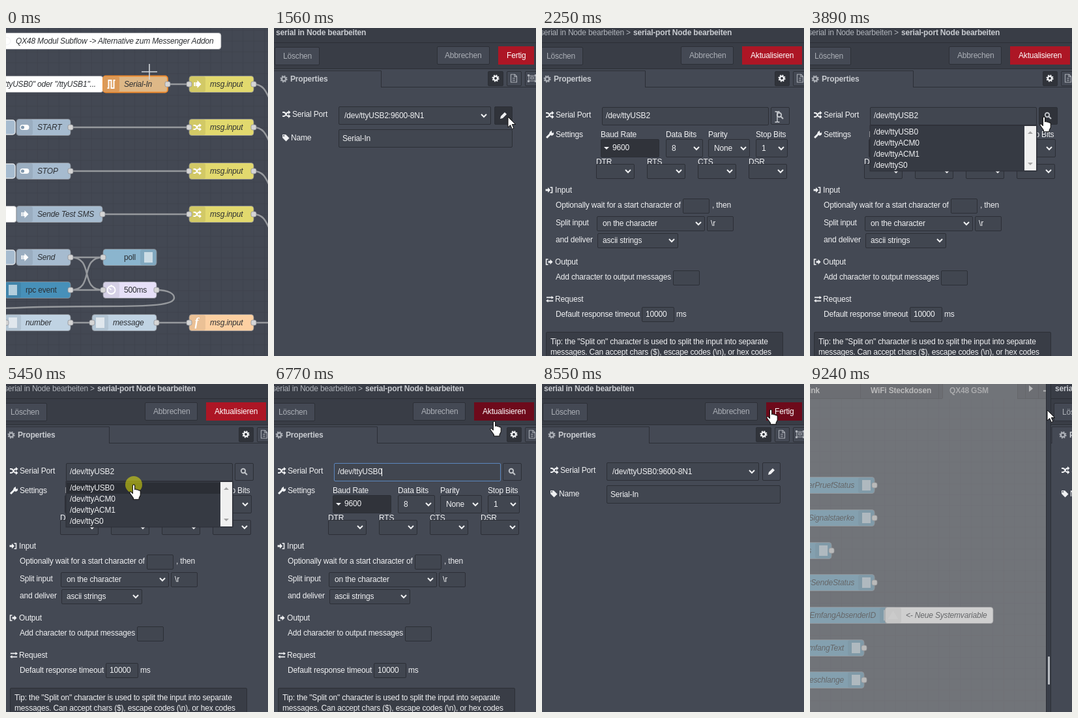
Animation, 402 px wide and 502 px high, one loop 9.31 s. Source, as an HTML page:

```html
<!DOCTYPE html>
<html lang="de">
<head>
<meta charset="utf-8">
<title>Serial port setup</title>
<style>
html, body { margin: 0; width: 100%; height: 100%; overflow: hidden; background: #434853; }
svg { display: block; width: 402px; height: 502px; font: 12px "Liberation Sans", Arial, sans-serif; letter-spacing: -.18px; }
text { white-space: pre; }
.line { fill: none; stroke: currentColor; }
</style>
</head>
<body>
<svg id="stage" viewBox="0 0 402 502"></svg>
<script>
const LOOP = 9310, BODY = '#444954', BAR = '#393d46', EDGE = '#2c2f36', LIGHT = '#f0f1f3', MUTED = '#abafb6';
const RED = '#ad1625', DARK_RED = '#6e0a1b', DARK = '#30333a';

// y is the middle of the text line
const text = (x, y, s, fill = LIGHT, extra = '') => `<text x="${x}" y="${y + 4}" fill="${fill}" ${extra}>${s}</text>`;
const bold = (x, y, s, fill = '#c9ccd1') => text(x, y, s, fill, 'font-weight="bold"');
const rect = (x, y, w, h, fill, extra = '') => `<rect x="${x}" y="${y}" width="${w}" height="${h}" fill="${fill}" ${extra}/>`;
const path = (d, extra = '') => `<path d="${d}" ${extra}/>`;
const stroke = (d, w = 2) => path(d, `class="line" stroke-width="${w}"`);
const group = (id, body, extra = '') => `<g id="${id}" ${extra}>${body}</g>`;

const icons = {
  cog: '<circle r="3.1" class="line" stroke-width="2.4"/><circle r="4.7" class="line" stroke-width="1.8" stroke-dasharray="1.9 1.79"/>',
  shuffle: stroke('M-6-3h2c4 0 3 6 7 6h1M-6 3h2c4 0 3-6 7-6h1', 1.8) + path('M3-6l3.5 3-3.5 3zM3 0l3.5 3-3.5 3z'),
  inject: path('M-5-3h2v6h-2zM-2-3h2v-3l6 6-6 6v-3h-2z'),
  toggle: '<rect x="-7" y="-4" width="14" height="8" rx="4"/><circle cx="-3" r="2.6" fill="#8199af"/>',
  wave: stroke('M-6 6h2v-12h4v12h4v-12h2', 2),
  timer: '<circle r="6" class="line" stroke-width="1.8"/>' + stroke('M0 0l-3-3M0-8v3', 1.6),
  func: '<text x="-4" y="5" font-family="Liberation Serif, serif" font-style="italic" font-weight="bold" font-size="18">f</text>',
  square: '<rect x="-6.5" y="-8" width="13" height="16" opacity=".6"/>',
  bubble: '<ellipse rx="7" ry="6" class="line" stroke="#ddd"/>',
  warn: path('M0-7l8 13h-16z', 'fill="#fff" opacity=".6"'),
  pencil: path('M-5 5l1-4 6-6 3 3-6 6z'),
  search: '<circle cx="-1" cy="-1" r="3.2" class="line" stroke-width="1.9"/>' + stroke('M1.5 1.5l3.5 3.5', 2.2),
  tag: path('M-5-5h5l5.5 5.5-5 5-5.5-5.5z') + '<circle cx="-3" cy="-3" r="1.1" fill="#444954"/>',
  wrench: stroke('M-5 5l6-6', 3) + path('M0-4l3-2v3l2 1 1-2 0 4-3 2-4-3z'),
  file: stroke('M-4.5-6h6l3 3v9h-9zM1-6v3.5h3.5M-2 0h4M-2 3h4', 1.1),
  frame: stroke('M-5-4h10v8h-10zM-2-2h4v3h-4z', 1.2) + path('M-7-6h3v3h-3zM4-6h3v3h-3zM-7 3h3v3h-3zM4 3h3v3h-3z'),
  enter: path('M-5.5-1.5h3.5v-2.5l4 4-4 4v-2.500h-3.500z') + stroke('M1.500-4h3v8h-3', 1.5),
  leave: path('M-1.500-1.500h3v-2.500l4 4-4 4v-2.500h-3z') + stroke('M-1.500-4h-3v8h3', 1.5),
  swap: path('M-6-4h9v-2l4 3-4 3v-2h-9zM6 4h-9v2l-4-3 4-3v2h9z', 'transform="scale(.85)"'),
  chevron: stroke('M-4-2l4 4 4-4', 2),
};
const icon = (name, x, y, color = LIGHT) =>
  `<g transform="translate(${x} ${y})" fill="${color}" color="${color}">${icons[name]}</g>`;

// Flow nodes
const port = (x, y) => rect(x - 4, y - 4, 8, 8, '#d5d5d5', 'rx="2.5" stroke="#8d9096" stroke-width=".8"');
function node(x, y, right, fill, label, o = {}) {
  const iconX = o.iconRight ? right - 25 : x;
  const at = o.textX ?? x + 32;
  return rect(x, y - 12.5, right - x, 25, fill, `rx="4" stroke="${o.border || '#8d9096'}" stroke-width="${o.border ? 1.8 : .8}"`)
    + (o.icon ? rect(iconX, y - 12, 25, 24, o.iconFill || '#000', `rx="3" opacity="${o.iconFill ? 1 : .07}"`) + icon(o.icon, iconX + 12.5, y, '#fff') : '')
    + text(at, y, label, '#2c2f33', `${o.plain ? '' : 'font-style="italic"'} ${o.end ? 'text-anchor="end"' : ''}`)
    + (o.ports || []).map(p => port(p, y)).join('');
}
const wire = d => path(d, 'fill="none" stroke="#96999d" stroke-width="2.5"');
const YELLOW = '#e2d96e', BLUE = '#a6bbcf', PALE = '#c0d3e3';
const rows = [86, 152, 219, 285];
const canvas = rect(0, 0, 402, 502, '#434853') + rect(0, 0, 402, 502, 'url(#grid)');
const leftButton = y => rect(-8, y - 11, 22, 22, BLUE, 'rx="4" stroke="#dfe3e8" stroke-width="1.5"');

const flow = canvas
  + rows.map((y, i) => wire(`M${[248, 99, 99, 148][i]} ${y}H281M380 ${y}C396 ${y} 400 ${y + 14} 405 ${y + 24}`)).join('')
  + wire('M99 351H149M99 401H149M99 351C137 351 111 401 149 401M99 401C137 401 111 351 149 351')
  + wire('M231 401C250 401 258 407 258 413C258 424 225 426 150 426C80 426 40 427-4 429M99 451H132M231 451H281M380 451H405')
  + node(-20, 20, 330, '#fff', 'QX48 Modul Subflow -&gt; Alternative zum Messenger Addon', { textX: 15 }) + icon('bubble', 0, 20)
  + node(-20, 86, 149, '#fff', 'ttyUSB0" oder "/ttyUSB1"...', { textX: -2 })
  + node(149, 86, 248, '#deb887', 'Serial-In', { icon: 'wave', iconFill: '#dc9a58', border: '#f08a2c', ports: [248] })
  + rows.map((y, i) => node(281, y, 380, YELLOW, 'msg.input', { icon: i ? 'shuffle' : 'inject', ports: [281, 380] })).join('')
  + leftButton(152) + leftButton(219) + leftButton(351)
  + node(16, 152, 99, BLUE, 'START', { icon: 'toggle', ports: [99] })
  + node(16, 219, 99, BLUE, 'STOP', { icon: 'toggle', ports: [99] })
  + node(-20, 285, 16, '#fff', '')
  + node(16, 285, 148, BLUE, 'Sende Test SMS', { icon: 'inject', ports: [148] })
  + node(16, 351, 99, BLUE, 'Send', { icon: 'inject', ports: [99] })
  + node(149, 351, 231, '#8bb5ce', 'poll', { icon: 'square', iconRight: true, plain: true, ports: [149] })
  + node(-2, 401, 99, '#4790b9', 'rpc event', { icon: 'square', plain: true, ports: [99] })
  + node(149, 401, 231, '#e6e0f8', '500ms', { icon: 'timer', plain: true, ports: [149, 231] })
  + node(-2, 451, 99, PALE, 'number', { icon: 'square', ports: [0, 99] })
  + node(132, 451, 231, PALE, 'message', { icon: 'square', ports: [132, 231] })
  + node(281, 451, 380, '#fdd0a2', 'msg.input', { icon: 'func', ports: [281, 380] });

// Shaded workspace behind the trays
const variable = (y, right, label) =>
  node(-20, y, right, '#69a1bf', label, { icon: 'square', iconRight: true, textX: right - 31, end: true, ports: [right] });
const tabLine = x => rect(x, 0, 1, 22, EDGE);
const shaded = canvas
  + rect(0, 0, 402, 22, BAR) + rect(203, 0, 115, 23, '#434853') + rect(0, 22, 203, 1, EDGE) + rect(318, 22, 84, 1, EDGE)
  + [77, 197, 203, 318, 330, 350, 380].map(tabLine).join('')
  + bold(-2, 10, 'ink', '#d6d6d8') + bold(93, 10, 'WiFi Steckdosen', '#d6d6d8') + bold(214, 10, 'QX48 GSM', '#b4b6ba')
  + path('M336 2l6 5-6 5z', 'fill="#d0d2d5"') + rect(358, 9.5, 10, 2, '#d0d2d5') + rect(362, 5.5, 2, 10, '#d0d2d5')
  + [6, 10, 14].map(y => rect(389, y, 2, 2, '#d0d2d5') + rect(392, y, 10, 2, '#d0d2d5')).join('')
  + variable(155, 99, 'erPruefStatus') + variable(205, 99, 'Signalstaerke') + variable(255, 33, 's')
  + variable(304, 99, 'erSendeStatus') + variable(354, 132, 'EmfangAbsenderID')
  + variable(404, 83, 'mfangText') + variable(453, 83, 'eschlange')
  + node(115, 354, 281, '#fff', '&lt;- Neue Systemvariable', { icon: 'warn' })
  + rect(392, 23, 10, 479, '#f1f1f1') + rect(394, 42, 8, 154, '#c1c1c1') + path('M394 34h8l-4-4z', 'fill="#888"')
  + rect(0, 0, 402, 502, '#a0a0a0', 'opacity=".5"');

// Tray parts
const box = (x, y, right, bottom, fill = '#414650', id = '', edge = EDGE) =>
  rect(x + .5, y + .5, right - x - 1, bottom - y - 1, fill, `rx="1.5" stroke="${edge}" ${id && `id="${id}"`}`);
const button = (x, right, label, textX, top = 28) => box(x, top, right, top + 28, BODY) + text(textX, top + 14, label, MUTED);
const redButton = (x, label, textX, id) => rect(x, 28, 399 - x, 28, RED, `id="${id}"`) + text(textX, 42, label, '#fff');
const select = (x, y, right, bottom, label = '', pad = 9) => {
  const middle = Math.floor((y + bottom) / 2);
  return box(x, y, right, bottom) + text(x + pad, middle, label) + icon('chevron', right - 10, middle);
};
const field = (x, y, right, label = '') => box(x, y, right, y + 23) + text(x + 6, y + 11, label);
const heading = (name, x, y, label, labelX) => icon(name, x, y) + text(labelX, y, label);
const tray = (left, tabRight) => rect(left, 0, 460, 502, BODY)
  + rect(left, 0, 460, 62, BAR) + rect(left, 22, 460, 1, EDGE) + rect(left, 62, 460, 1, EDGE)
  + rect(left + 7, 90, 460, 1, EDGE) + path(`M${left + 9} 91V65.5H${tabRight}.5V91`, `fill="${BODY}" stroke="${EDGE}"`)
  + rect(left, 0, 7, 502, '#393e48') + rect(left, 0, 1, 502, EDGE) + rect(left + 7, 0, 1, 502, EDGE)
  + rect(left + 3, 417, 3, 43, '#b9bcc1', 'rx="1"');

const trayNode = tray(-11, 164)
  + bold(3, 7, 'serial in Node bearbeiten')
  + button(1, 70, 'Löschen', 14, 29) + button(250, 331, 'Abbrechen', 262) + redButton(344, 'Fertig', 357, 'done')
  + icon('cog', 15, 78, MUTED) + bold(25, 78, 'Properties')
  + box(328, 66, 352, 89, DARK) + icon('cog', 340, 77) + box(357, 66, 380, 89, BODY) + icon('file', 368, 77, MUTED)
  + box(385, 66, 409, 89, BODY) + icon('frame', 396, 77, MUTED)
  + heading('shuffle', 19, 132, 'Serial Port', 28) + box(99, 120, 333, 148)
  + text(108, 134, '', LIGHT, 'id="portChoice"') + icon('chevron', 322, 134)
  + box(338, 120, 366, 148, BODY, 'edit') + icon('pencil', 352, 134)
  + heading('tag', 18, 168, 'Name', 26) + box(99, 155, 366, 183) + text(105, 169, 'Serial-In');

const list = rect(92, 149, 256, 70, '#363a43', `stroke="${EDGE}"`)
  + rect(93, 151, 236, 17, '#2b2e35', 'id="hover"')
  + ['USB0', 'ACM0', 'ACM1', 'S0'].map((n, i) => text(98, 159 + 17 * i, '/dev/tty' + n)).join('')
  + rect(329, 150, 18, 68, '#f0f0f0') + path('M334 162h8l-4-4zM334 206h8l-4 4z', 'fill="#a3a3a3"');

const trayPort = tray(-18, 158)
  + text(-3, 7, 'serial in Node bearbeiten &gt;', '#b0b4bb') + bold(140, 7, 'serial-port Node bearbeiten')
  + button(-6, 63, 'Löschen', 7, 29) + button(213, 294, 'Abbrechen', 226) + redButton(307, 'Aktualisieren', 320, 'update')
  + icon('cog', 8, 78, MUTED) + bold(18, 78, 'Properties')
  + box(357, 66, 380, 89, DARK) + icon('cog', 368, 77) + box(385, 66, 409, 89, BODY) + icon('file', 396, 77, MUTED)
  + heading('shuffle', 12, 133, 'Serial Port', 21) + box(92, 121, 348, 149, undefined, 'portField')
  + text(98, 134, '', LIGHT, 'id="portName"') + rect(165, 129, 1, 12, '#fff', 'id="caret"')
  + box(351, 121, 380, 148, BODY, 'find') + icon('search', 365, 134, '#bfc2c7')
  + heading('wrench', 12, 163, 'Settings', 21)
  + [[90, 'Baud Rate'], [190, 'Data Bits'], [255, 'Parity'], [328, 'Stop Bits']].map(([x, s]) => text(x, 163, s)).join('')
  + box(90, 170, 180, 198, DARK) + path('M95 182h8l-4 4z', `fill="${LIGHT}"`) + text(108, 183, '9600')
  + select(190, 170, 247, 198, '8') + select(255, 170, 319, 198, 'None') + select(328, 170, 377, 198, '1')
  + ['DTR', 'RTS', 'CTS', 'DSR'].map((s, i) => text(83 + 78 * i, 205, s) + select(83 + 78 * i, 208, 142 + 78 * i, 231)).join('')
  + heading('enter', 11, 248, 'Input', 20)
  + text(21, 271, 'Optionally wait for a start character of') + field(216, 261, 257) + text(261, 271, ', then')
  + text(21, 298, 'Split input') + select(84, 288, 250, 311, 'on the character') + field(253, 288, 294, '\\r')
  + text(21, 324, 'and deliver') + select(85, 314, 209, 337, 'ascii strings', 8)
  + heading('leave', 11, 358, 'Output', 20)
  + text(21, 381, 'Add character to output messages') + field(201, 371, 242)
  + heading('swap', 12, 415, 'Request', 20)
  + text(21, 438, 'Default response timeout') + field(153, 427, 203, '10000') + text(206, 438, 'ms')
  + box(6, 465, 370, 520, BAR)
  + text(13, 480, 'Tip: the "Split on" character is used to split the input into separate')
  + text(13, 496, 'messages. Can accept chars ($), escape codes (\\n), or hex codes')
  + group('list', list);

// Pointer shapes, hot spot at 0,0
const outlined = 'fill="#fff" stroke="#111" stroke-width="1" stroke-linejoin="round"';
const pointers = {
  cross: stroke('M-12 0h24M0-12v24', 1.6),
  arrow: path('M0 0v16l3.7-3.5 2.6 6 2.6-1.1-2.6-5.9h5.2z', outlined),
  beam: stroke('M-3.5-8h2.5l1 1 1-1h2.5M0-7v14M-3.5 8h2.5l1-1 1 1h2.5', 1.3),
  hand: path('M-1.5 1q1.5-2 3 0v6l1-.5q1.5-.3 2 1 1.5-.8 2.3.7 2-.7 2.7 1.3v5.5l-2 4v2h-8v-2l-5-7q-.5-2.5 1.5-2l2.5 2.5z', `${outlined} transform="scale(1.08)"`),
};

stage.innerHTML = `<defs><pattern id="grid" width="16.6" height="16.6" patternUnits="userSpaceOnUse">
  <path d="M0 3.5H16.6M15 0V16.6" stroke="#000" stroke-opacity=".07" fill="none"/></pattern></defs>`
  + group('flow', flow) + group('shaded', shaded) + group('trayNode', trayNode) + group('trayPort', trayPort)
  + group('pointer', '<circle id="click" r="13" fill="#ff0" opacity=".47"/>'
    + Object.entries(pointers).map(([k, s]) => group(k, s, 'color="#d3d6da"')).join(''));

// Timelines: each entry holds until the next
const nodeSlide = [[0, 450], [1090, 40], [1170, 0], [1640, 95], [1710, 300], [1790, 450],
  [7690, 344], [7770, 104], [7840, 17], [7920, 0], [9080, 70], [9160, 220], [9240, 373]];
const portSlide = [[0, 450], [2020, 344], [2100, 104], [2180, 17], [2250, 0],
  [7150, 80], [7230, 270], [7300, 400], [7380, 450]];
const moves = [[0, 220, 67, 'cross'], [70, 217, 73, 'cross'], [150, 213, 81, 'cross'], [230, 210, 87, 'cross'],
  [310, 208.5, 90.5, 'cross'], [920, 260, 106, 'arrow'], [1090, 345, 131, 'arrow'], [1170, 359, 136, 'arrow'],
  [2020, 361, 136, 'beam'], [3660, 359, 136, 'hand'], [4820, 344, 138, 'hand'], [4900, 302, 146, 'hand'],
  [4980, 250, 152, 'hand'], [5050, 214, 154, 'hand'], [5130, 196, 154, 'hand'], [5600, 196, 155, 'arrow'],
  [6460, 208, 147, 'arrow'], [6540, 242, 121, 'arrow'], [6620, 287, 90, 'arrow'], [6700, 323, 66, 'arrow'],
  [6770, 338, 57, 'hand'], [6850, 344, 46, 'hand'], [6920, 347, 39, 'hand'], [7230, 347, 39, 'arrow'],
  [7920, 347, 39, 'hand'], [8550, 351, 39, 'hand'], [8620, 357, 39, 'hand'], [8700, 361, 40, 'hand'],
  [8770, 364, 40, 'hand'], [9160, 364, 40, 'arrow']];
const clicks = [[460, 540], [690, 770], [1470, 1560], [3490, 3660], [5450, 5530], [7070, 7150], [9000, 9080]];

const $ = id => document.getElementById(id);
const current = (steps, t) => steps.findLast(s => s[0] <= t);
const within = (t, from, to) => t >= from && t < to;
const show = (id, on) => $(id).setAttribute('display', on ? 'inline' : 'none');
const paint = (id, fill) => $(id).setAttribute('fill', fill);
const move = (id, x, y = 0) => $(id).setAttribute('transform', `translate(${x} ${y})`);

function draw(t) {
  show('flow', t < 920);
  show('shaded', t >= 920);
  move('trayNode', current(nodeSlide, t)[1]);
  move('trayPort', current(portSlide, t)[1]);

  const chosen = t >= 5600, device = '/dev/ttyUSB' + (chosen ? 0 : 2);
  $('portChoice').textContent = device + ':9600-8N1';
  $('portName').textContent = device;
  $('portField').setAttribute('stroke', chosen ? '#5b86bd' : EDGE);
  show('caret', within(t, 5600, 6060) || within(t, 6540, 7070));
  paint('edit', within(t, 1170, 1710) ? DARK : BODY);
  paint('find', within(t, 3660, 4900) ? DARK : BODY);
  paint('update', within(t, 6770, 7230) ? DARK_RED : RED);
  paint('done', within(t, 7920, 9160) ? DARK_RED : RED);
  show('list', within(t, 3890, 5600));
  show('hover', t >= 4980);

  const [, x, y, kind] = current(moves, t);
  move('pointer', x, y);
  for (const k in pointers) show(k, k === kind);
  show('click', clicks.some(([from, to]) => within(t, from, to)));
}

const start = performance.now();
(function tick() {
  draw((performance.now() - start) % LOOP);
  requestAnimationFrame(tick);
})();
</script>
</body>
</html>
```
